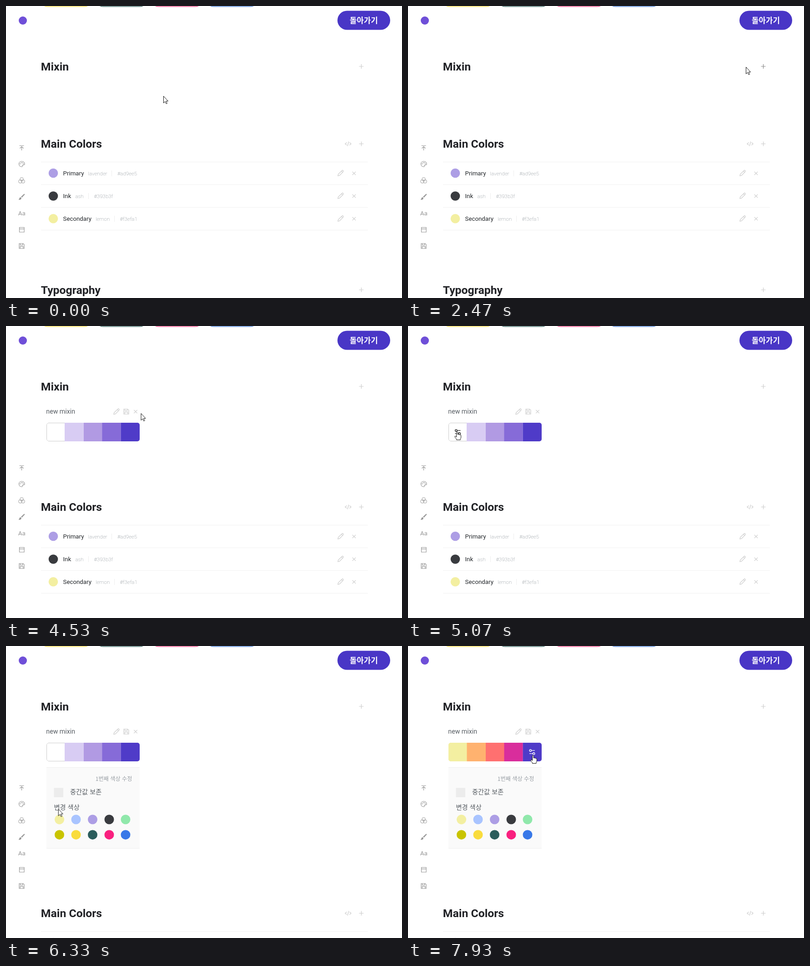
These frames come from a looping animation (871x643 px, 8000 ms). An HTML page:

```html
<!DOCTYPE html>
<html lang="ko">
<head>
<meta charset="utf-8">
<title>Mixin editor</title>
<style>
html, body { margin: 0; width: 100%; height: 100%; overflow: hidden; background: #fff; }
svg { display: block; width: 871px; height: 643px; }
text { font-family: Roboto, "Noto Sans CJK KR", "Noto Sans CJK", sans-serif; }
.title { font-size: 24.8px; font-weight: 700; fill: #212226; }
.name { font-size: 13.3px; fill: #212529; }
.thin { font-size: 11.6px; font-weight: 100; fill: #6c757d; }
.label { font-size: 14.2px; fill: #555b61; }
.kr { font-family: "Noto Sans CJK KR", "Noto Sans CJK", sans-serif; }
.icons { fill: none; stroke: #ccc; stroke-width: 1.2; }
.side { fill: none; stroke: #999; stroke-width: 1.2; }
.rule { stroke: #f1f1f1; }

/* every track shares one 8 s clock */
.cursor, .below, .hand, .arrow, .mixin, .panel, .warm, .tune1, .tune5, .plus, .dot {
  animation: 8s linear infinite;
}
.hand, .arrow, .mixin, .panel, .warm, .tune1, .tune5, .below { animation-timing-function: step-end; }
.cursor { animation-name: travel; }
.below { animation-name: push; }
.hand { animation-name: hand; }
.arrow { animation-name: arrow; }
.mixin { animation-name: mixin; }
.panel { animation-name: panel; }
.warm { animation-name: warm; }
.tune1 { animation-name: tune1; }
.tune5 { animation-name: tune5; }
.plus { animation-name: plus; }
.dot { animation-name: grow; transform-box: fill-box; transform-origin: center; }

@keyframes travel {
  0%, .8% { transform: translate(346px, 198px); }
  3.375%, 5.4% { transform: translate(349px, 198px); }
  14.125% { transform: translate(550px, 131px); }
  15.875% { transform: translate(640px, 130px); }
  18.375% { transform: translate(690px, 124px); }
  21.6% { transform: translate(748px, 146px); }
  24.1% { transform: translate(742px, 171px); }
  26.6% { transform: translate(738px, 164px); }
  30.875% { transform: translate(743px, 134px); }
  32.5% { transform: translate(743px, 134px); animation-timing-function: ease-in-out; }
  37.5% { transform: translate(776px, 135px); }
  43.4% { transform: translate(776px, 135px); animation-timing-function: ease-in-out; }
  52.5%, 56.625% { transform: translate(297px, 192px); }
  60.9% { transform: translate(130px, 212px); }
  64.1% { transform: translate(102px, 238px); }
  72.5% { transform: translate(102px, 238px); animation-timing-function: ease-in-out; }
  81.6%, 83.375% { transform: translate(117px, 380px); }
  86.5% { transform: translate(118px, 378px); }
  89.1% { transform: translate(119px, 364px); }
  94.125% { transform: translate(239px, 264px); }
  99.1%, 100% { transform: translate(275px, 240px); }
}
@keyframes hand {
  0%, 44.1%, 74.7%, 88.9% { opacity: 0; }
  36.1%, 60.9%, 80%, 96.2%, 100% { opacity: 1; }
}
@keyframes arrow {
  0%, 44.1%, 74.7%, 88.9% { opacity: 1; }
  36.1%, 60.9%, 80%, 96.2%, 100% { opacity: 0; }
}
@keyframes push {
  0% { transform: none; }
  40.875% { transform: translateY(95px); }
  65%, 100% { transform: translateY(285px); }
}
@keyframes mixin { 0% { opacity: 0; } 40.875%, 100% { opacity: 1; } }
@keyframes panel { 0% { opacity: 0; } 65%, 100% { opacity: 1; } }
@keyframes warm { 0% { opacity: 0; } 83.375%, 100% { opacity: 1; } }
@keyframes tune1 { 0%, 74.7%, 100% { opacity: 0; } 60.9% { opacity: 1; } }
@keyframes tune5 { 0% { opacity: 0; } 96.2%, 100% { opacity: 1; } }
@keyframes plus {
  0%, 11%, 24%, 28%, 48.5%, 100% { stroke: #ccc; }
  13%, 22.3%, 30%, 46.8% { stroke: #888; }
}
@keyframes grow {
  0%, 80%, 91%, 100% { transform: scale(1); }
  82%, 89.2% { transform: scale(1.1); }
}
</style>
</head>
<body>
<svg viewBox="0 0 871 643">
  <defs>
    <path id="add" d="M-5 0H5M0-5V5"/>
    <path id="close" d="M-3.7-3.7L3.7 3.7M3.7-3.7L-3.7 3.7"/>
    <path id="pencil" d="M-6 6l.8-3.6L3.2-5.8q1.2-1 2.4.2t.2 2.4L-2.4 5.2ZM1.8-4.4l2.8 2.8"/>
    <path id="save" d="M-5.5-5.5H3.2L5.5-3.2V5.5H-5.5ZM-3-5.5V-2H2V-5.5M-3.2 5.5V.8H3.2V5.5"/>
    <path id="code" d="M-3-3l-3.5 3 3.5 3M3-3l3.5 3-3.5 3M1.3-5L-1.3 5"/>
    <g id="tune" fill="none" stroke-width="1.4">
      <circle cx="-3.6" cy="-3.4" r="2.2"/>
      <circle cx="3.6" cy="3.4" r="2.2"/>
      <path d="M-1.4-3.4H6M-6 3.4H1.4"/>
    </g>
    <path id="pill" fill="none" d="M0-.5q4 1.8 8 1.8H88q4 0 8-1.8"/>
    <g id="edit">
      <use href="#pencil" x="736" y="368"/>
      <use href="#close" x="765.5" y="368.5"/>
    </g>
    <clipPath id="bar"><rect x="89" y="213" width="205" height="41" rx="5"/></clipPath>
  </defs>

  <g stroke-width="1.3">
    <use href="#pill" x="84" stroke="#f7dc3c"/>
    <use href="#pill" x="206" stroke="#2b5d5a"/>
    <use href="#pill" x="328" stroke="#f0387d"/>
    <use href="#pill" x="449" stroke="#3a78d8"/>
  </g>
  <circle cx="37" cy="32" r="9" fill="#6f4fd8"/>
  <rect x="729" y="10.5" width="116" height="42" rx="21" fill="#4936c6"/>
  <text class="kr" x="787" y="38" font-size="16.8" font-weight="700" fill="#fff" text-anchor="middle">돌아가기</text>

  <text class="title" x="76.8" y="142">Mixin</text>
  <g class="icons"><use class="plus" href="#add" x="781.5" y="133"/></g>

  <g class="mixin">
    <text class="label" x="88.3" y="193">new mixin</text>
    <g class="icons">
      <use href="#pencil" x="243" y="188.5"/>
      <use href="#save" x="264.5" y="188.5"/>
      <use href="#close" x="285" y="188.5"/>
    </g>
    <g clip-path="url(#bar)">
      <rect x="89.5" y="213.5" width="60" height="40" rx="4.5" fill="#fff" stroke="#ccc"/>
      <path fill="#d8ccf3" d="M129 213h42v41h-42z"/>
      <path fill="#b19ae3" d="M171 213h41v41h-41z"/>
      <path fill="#866bd8" d="M211.500 213h41v41h-41z"/>
      <path fill="#4f3bc8" d="M252.500 213h42v41h-42z"/>
      <g class="warm">
        <path fill="#f3efa1" d="M89 213h41v41H89z"/>
        <path fill="#ffb26f" d="M129.500 213h42v41h-42z"/>
        <path fill="#ff7070" d="M171 213h41v41h-41z"/>
        <path fill="#d92d9c" d="M211.500 213h41v41h-41z"/>
      </g>
    </g>
    <g class="tune1" stroke="#222"><use href="#tune" x="109.500" y="233.500"/></g>
    <g class="tune5" stroke="#fff"><use href="#tune" x="273" y="233.500"/></g>
  </g>

  <g class="panel">
    <rect x="89" y="267" width="205" height="179" fill="#fafafa"/>
    <path stroke="#eee" d="M89 267.500H294M89 445.500H294"/>
    <text class="kr" x="277.500" y="297" font-size="12.2" fill="#999fa5" text-anchor="end">1번째 색상 수정</text>
    <rect x="105.500" y="312.500" width="20.500" height="20.500" fill="#ececec"/>
    <text class="label kr" x="141" y="326">중간값 보존</text>
    <text class="label kr" x="105.500" y="360">변경 색상</text>
    <circle class="dot" cx="117.500" cy="382" r="10.500" fill="#f3efa1"/>
    <circle cx="154" cy="382" r="10.500" fill="#a9c4ff"/>
    <circle cx="190.500" cy="382" r="10.500" fill="#ad9ee5"/>
    <circle cx="227" cy="382" r="10.500" fill="#393b3f"/>
    <circle cx="263" cy="382" r="10.500" fill="#90e8ab"/>
    <circle cx="117.500" cy="415.700" r="10.500" fill="#c9c400"/>
    <circle cx="154" cy="415.700" r="10.500" fill="#f9dc3c"/>
    <circle cx="190.500" cy="415.700" r="10.500" fill="#2b5d5c"/>
    <circle cx="227" cy="415.700" r="10.500" fill="#f9207f"/>
    <circle cx="263" cy="415.700" r="10.500" fill="#3878e8"/>
  </g>

  <g class="below">
    <text class="title" x="76.8" y="312">Main Colors</text>
    <path class="rule" d="M77 343.500H796M77 393.500H796M77 443.500H796M77 493.500H796"/>
    <path stroke="#eee" d="M232.500 362v13M181.500 412v13M238.500 462v13"/>
    <circle cx="104" cy="368" r="10.300" fill="#ad9ee5"/>
    <text class="name" x="125.500" y="373">Primary</text>
    <text class="thin" x="180.500" y="373">lavender</text>
    <text class="thin" x="245" y="373">#ad9ee5</text>
    <circle cx="104" cy="418.500" r="10.300" fill="#393b3f"/>
    <text class="name" x="125.500" y="423">Ink</text>
    <text class="thin" x="152.500" y="423">ash</text>
    <text class="thin" x="193.500" y="423">#393b3f</text>
    <circle cx="104" cy="468.300" r="10.300" fill="#f3efa1"/>
    <text class="name" x="125.500" y="473">Secondary</text>
    <text class="thin" x="197" y="473">lemon</text>
    <text class="thin" x="250.500" y="473">#f3efa1</text>
    <g class="icons">
      <use href="#code" x="752.500" y="303.500"/>
      <use href="#add" x="781.500" y="303.500"/>
      <use href="#edit"/>
      <use href="#edit" y="50"/>
      <use href="#edit" y="100"/>
      <use href="#add" x="781.500" y="625"/>
    </g>
    <text class="title" x="76.8" y="634">Typography</text>
  </g>

  <g class="side">
    <path d="M29.500 307.500h10M34.500 318v-8M30.500 313.500l4-4 4 4"/>
    <path d="M34.500 342c-8 0-8 12 0 12 2.500 0 1-2 1.300-3 .5-1.300 5.200.5 5.200-3.500 0-3-3-5.500-6.500-5.500z"/>
    <g fill="#999" stroke="none">
      <circle cx="31.300" cy="347.500" r="1"/>
      <circle cx="33.300" cy="345" r="1"/>
      <circle cx="36.200" cy="345" r="1"/>
      <circle cx="38.200" cy="347.500" r="1"/>
    </g>
    <g stroke-width="1">
      <circle cx="34.500" cy="381.500" r="3.800"/>
      <circle cx="31.500" cy="386.300" r="3.800"/>
      <circle cx="37.500" cy="386.300" r="3.800"/>
    </g>
    <path fill="#999" stroke="none" d="M40 413.500l1.500 1.500-6.500 7-2-2zM32 421l2 2c0 3-3 4.500-6.500 3.500 2-.8 1.500-5 4.500-5.500z"/>
    <path d="M29.500 487.500h10.500v10.500h-10.500zM29.500 490.800h10.500"/>
    <use href="#save" x="34.500" y="528.500"/>
  </g>
  <text x="26.800" y="461" font-size="13.500" fill="#999">Aa</text>

  <g class="cursor" fill="#fff" stroke="#111">
    <path class="arrow" d="M.5.5V15.500l3.500-3.200 2.300 5 2.200-1-2.300-4.900H10.500Z"/>
    <path class="hand" d="M-1.500 1.700q0-1.300 1.400-1.300 1.300 0 1.300 1.300V6.500q2-.9 2.400.4 2-.7 2.500.6 2.200-.4 2.200 1.500V13q0 2-1.300 3.200V18.500H-1.500V17q-2.200-2.300-3.600-5-.8-1.600.6-1.800 1.300 0 3 2Z"/>
  </g>
</svg>
</body>
</html>
```
